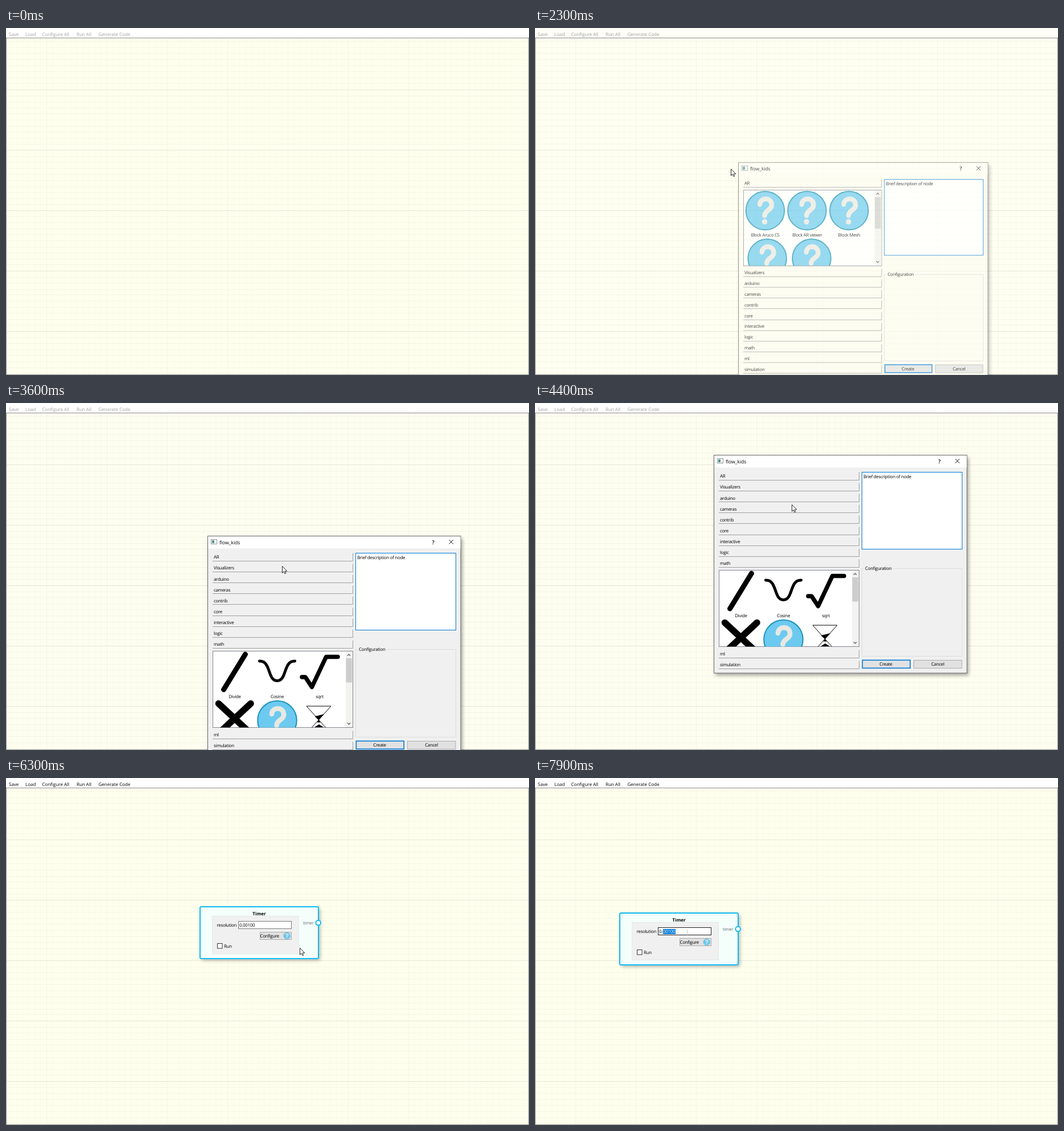
An HTML page that plays this animation: 919x609 px, repeating every 8 s.

```html
<!DOCTYPE html>
<html lang="en">
<head>
<meta charset="utf-8">
<title>Node editor</title>
<style>
html, body { margin: 0; width: 100%; height: 100%; overflow: hidden; background: #fff; }
#stage { display: block; width: 100%; height: 100%; }
text { font: 7.9px "Open Sans", "Noto Sans", sans-serif; letter-spacing: -.28px; text-rendering: geometricPrecision; white-space: pre; }
.mid { text-anchor: middle; }
.menu text { font-size: 8px; letter-spacing: 0; }
.title { font-size: 8.5px; letter-spacing: 0; }
.line { fill: none; stroke: #000; stroke-linecap: round; stroke-linejoin: round; }
.row { fill: none; stroke: #a0a0a0; }
.panel { fill: #fff; stroke: #828790; }
.btn { fill: #e1e1e1; stroke: #adadad; }
.main { stroke: #0078d7; stroke-width: 1.6; }
.group { fill: none; stroke: #dcdcdc; }
.arrow { fill: none; stroke: #505050; stroke-width: 1.2; }

/* 1% = 80 ms */
.menu, .paper, .bar, .face, .cap, .pop, .ar, .math, .before, .after, .node, .pick, .field, .ptr, .beam {
  animation: 8s step-end infinite;
}
.menu { animation-name: menu; }
.bar { animation-name: bar; }
.paper { animation-name: paper; }
.face { animation-name: face; }
.cap { animation-name: bar; }
.pop { animation-name: pop; transform-origin: 537px 283px; }
.ar { animation-name: ar; }
.math { animation-name: math; }
.before { animation-name: before; }
.after { animation-name: after; }
.node { animation-name: node; }
.pick { animation-name: pick; }
.field { animation-name: field; }
.ptr { animation-name: ptr; }
.beam { animation-name: beam; }
.drag { animation: drag 8s linear infinite; }
.carry { animation: carry 8s linear infinite; }
.path { animation: path 8s linear infinite; }

@keyframes menu { 0%, 26.25% { fill: #a0a0a0 } 16.25%, 75%, 100% { fill: #000 } }
@keyframes bar { 0%, 30%, 75%, 100% { fill: #fff } 27.5% { fill: #fefef6 } 63.75% { fill: #fcfcf3 } }
@keyframes paper { 0%, 75%, 100% { fill: #ffffee } 27.5% { fill: #fefef1 } 30% { fill: #fefef0 } 63.75% { fill: #fcfcf2 } }
@keyframes face { 0%, 30%, 75%, 100% { fill: #f0f0f0 } 27.5%, 63.75% { fill: #fcfcf2 } }
@keyframes pop {
  0%, 73.75%, 100% { opacity: 0; transform: scale(.96) }
  27.5% { opacity: .3; transform: scale(.965) }
  28.75% { opacity: .7; transform: scale(.986) }
  30% { opacity: 1; transform: none }
  72.5% { opacity: .6; transform: scale(.98) }
}
@keyframes ar { 0% { visibility: visible } 40%, 100% { visibility: hidden } }
@keyframes math { 0% { visibility: hidden } 40%, 100% { visibility: visible } }
@keyframes before { 0% { visibility: visible } 63.75%, 100% { visibility: hidden } }
@keyframes after { 0% { visibility: hidden } 63.75%, 100% { visibility: visible } }
@keyframes node { 0% { visibility: hidden } 75%, 100% { visibility: visible } }
@keyframes pick { 0% { opacity: 0 } 93.75%, 100% { opacity: 1 } }
@keyframes field { 0% { stroke: #7a7a7a } 92.5%, 100% { stroke: #222 } }
@keyframes ptr { 0%, 91.25%, 100% { visibility: hidden } 7.5% { visibility: visible } }
@keyframes beam { 0% { visibility: hidden } 91.25%, 100% { visibility: visible } }
@keyframes drag {
  0% { transform: translate(40px, 142px) }
  47.5% { transform: translate(40px, 142px); animation-timing-function: steps(4) }
  52.5%, 100% { transform: none }
}
@keyframes carry {
  0% { transform: translate(0, 0) }
  81.25% { transform: translate(0, 0); animation-timing-function: steps(5) }
  87.5%, 100% { transform: translate(-192px, 11px) }
}
@keyframes path {
  0% { transform: translate(58px, 3px) }
  7.5% { transform: translate(58px, 3px); animation-timing-function: steps(5) }
  13.75% { transform: translate(353px, 227px) }
  20% { transform: translate(353px, 227px); animation-timing-function: steps(3) }
  23.75% { transform: translate(344px, 247px) }
  28.75% { transform: translate(344px, 247px); animation-timing-function: steps(6) }
  36.25% { transform: translate(403px, 537px); animation-timing-function: steps(1) }
  37.5% { transform: translate(403px, 561px) }
  40% { transform: translate(403px, 561px); animation-timing-function: steps(2) }
  42.5% { transform: translate(445px, 410px); animation-timing-function: steps(1) }
  45% { transform: translate(485px, 286px); animation-timing-function: steps(2) }
  47.5% { transform: translate(482px, 243px); animation-timing-function: steps(4) }
  52.5% { transform: translate(442px, 101px); animation-timing-function: steps(2) }
  55% { transform: translate(451px, 178px); animation-timing-function: steps(5) }
  61.25% { transform: translate(509px, 407px) }
  63.75% { transform: translate(509px, 407px); animation-timing-function: steps(1) }
  65% { transform: translate(601px, 412px); animation-timing-function: steps(5) }
  71.25% { transform: translate(621px, 295px) }
  75% { transform: translate(621px, 295px); animation-timing-function: steps(3) }
  78.75% { transform: translate(516px, 298px) }
  81.25% { transform: translate(516px, 298px); animation-timing-function: steps(5) }
  87.5% { transform: translate(324px, 309px); animation-timing-function: steps(3) }
  91.25%, 100% { transform: translate(267px, 270px) }
}
</style>
</head>
<body>
<svg id="stage" viewBox="0 0 919 609" preserveAspectRatio="none">
  <defs>
    <clipPath id="arClip"><rect x="324" y="141" width="233" height="134"/></clipPath>
    <clipPath id="mathClip"><rect x="324" y="294" width="233" height="133.5"/></clipPath>
    <g id="help">
      <circle r="34.3" fill="#6ccaf0" stroke="#1a93b8" stroke-width="2"/>
      <path d="M-9.5-11C-9-24.500 13-24.500 11.500-8.500C10-.5-1 0-1 9" fill="none" stroke="#e8e8e2" stroke-width="8.500" stroke-linecap="round"/>
      <circle cx="-1" cy="20" r="4.800" fill="#e8e8e2"/>
    </g>
    <g id="glass">
      <path d="M488 390H531L488 438H531Z" fill="none" stroke="currentColor"/>
      <path d="M502.500 408L519 404L509.500 414.500ZM509.500 414L506.500 418.500H512.500ZM502 427L510 422L518 427Z" fill="currentColor"/>
    </g>
    <filter id="soft" x="-10%" y="-10%" width="125%" height="125%">
      <feGaussianBlur stdDeviation="3"/>
    </filter>
  </defs>

  <rect class="bar" width="919" height="18"/>
  <rect class="paper" y="18" width="919" height="591"/>
  <g id="grid" stroke="#000"></g>
  <rect x=".5" y="17.500" width="918" height="591" fill="none" stroke="#8c8c8c"/>
  <g class="menu">
    <text x="5" y="14">Save</text>
    <text x="34" y="14">Load</text>
    <text x="63.500" y="14">Configure All</text>
    <text x="124" y="14">Run All</text>
    <text x="162.500" y="14">Generate Code</text>
  </g>

  <g class="node"><g class="carry">
    <rect x="344" y="229" width="208" height="91" rx="2" opacity=".3" filter="url(#soft)"/>
    <rect x="341" y="226" width="208" height="91" rx="2" fill="#f4fffc" stroke="#10baf5" stroke-width="2"/>
    <text class="mid" x="445" y="241" style="font-weight:700;font-size:8px;letter-spacing:0">Timer</text>
    <rect x="362.500" y="242.500" width="152" height="66" fill="#f0f0f0" stroke="#e6e8e6"/>
    <text x="370.500" y="261.300">resolution</text>
    <rect class="field" x="408.500" y="251.500" width="93" height="13" fill="#fff"/>
    <text x="410" y="261.300">0.00100</text>
    <g class="pick">
      <rect x="417" y="254" width="22" height="9" fill="#0078d7"/>
      <text x="417" y="261.300" fill="#fff">00100</text>
    </g>
    <rect class="btn" x="446.500" y="270.500" width="55" height="13"/>
    <text x="446.500" y="280.300">Configure</text>
    <use href="#help" transform="translate(493.700 277) scale(.17)"/>
    <rect x="371.500" y="290.500" width="8.500" height="8.500" fill="#fff" stroke="#333"/>
    <text x="383" y="298.300">Run</text>
    <text x="522" y="256.700" fill="#666" style="font-size:7.500px;letter-spacing:-.1px">timer</text>
    <circle cx="548.700" cy="254" r="4.300" fill="#fff" stroke="#10baf5" stroke-width="2"/>
  </g></g>

  <g class="drag"><g class="pop">
    <rect x="317" y="96" width="445" height="382" opacity=".35" filter="url(#soft)"/>
    <rect class="face" x="314.500" y="91.500" width="444.500" height="382.500" stroke="#666"/>
    <rect class="cap" x="315" y="92" width="443.500" height="21"/>
    <rect x="320.500" y="97.500" width="10" height="8" fill="#fff" stroke="#8a9496"/>
    <rect x="322" y="99" width="4" height="5" fill="#4d9288"/>
    <text class="title" x="335" y="106">flow_kids</text>
    <text class="mid" x="710.500" y="105.500" style="font-size:9.500px;font-weight:600">?</text>
    <path d="M738.500 98L746 105.500M746 98L738.500 105.500" stroke="#111"/>

    <g class="ar">
      <g id="arRows"></g>
      <rect class="panel" x="323.500" y="140.500" width="246" height="135"/>
      <g clip-path="url(#arClip)">
        <use href="#help" x="362" y="177"/>
        <use href="#help" x="436.600" y="177"/>
        <use href="#help" x="511.500" y="177"/>
        <use href="#help" x="365.700" y="262"/>
        <use href="#help" x="444.800" y="262"/>
      </g>
      <text class="mid" x="362" y="223">Block Aruco CS</text>
      <text class="mid" x="437" y="223">Block AR viewer</text>
      <text class="mid" x="511.500" y="223">Block Mesh</text>
      <rect x="557" y="141" width="12" height="134" fill="#f2f2f0"/>
      <rect x="557.500" y="153" width="10.500" height="56" fill="#cdcdcd"/>
      <path class="arrow" d="M560 148.500L562.500 146L565 148.500M560 267L562.500 269.500L565 267"/>
    </g>

    <g class="math">
      <g id="mathRows"></g>
      <rect class="panel face-in" x="323.500" y="293.500" width="246" height="134"/>
      <g clip-path="url(#mathClip)">
        <path class="line" d="M342.500 361L380.500 299" stroke-width="9"/>
        <path class="line" d="M405.500 311C426 310 419 345.500 436.500 345.500C454 345.500 447 310 467.500 311" stroke-width="5"/>
        <path class="line" d="M480 339H486L497.500 356.500L522.500 303.500H543" stroke-width="7.500"/>
        <path class="line" d="M333.500 385.500L390 438M390 385.500L333.500 438" stroke-width="11.500"/>
        <use href="#help" x="436.500" y="415"/>
        <use href="#glass" color="#000"/>
      </g>
      <text class="mid" x="362" y="375.700">Divide</text>
      <text class="mid" x="436.500" y="375.700">Cosine</text>
      <text class="mid" x="511" y="375.700">sqrt</text>
      <rect x="557" y="294" width="12" height="133" fill="#f2f2f0"/>
      <rect x="557.500" y="306" width="10.500" height="42.500" fill="#cdcdcd"/>
      <path class="arrow" d="M560 301.500L562.500 299L565 301.500M560 419.500L562.500 422L565 419.500"/>
    </g>

    <g class="before">
      <rect x="574.500" y="121.500" width="176" height="135" fill="#fff" stroke="#0078d7"/>
      <text x="577" y="132">Brief description of node</text>
      <path class="group" d="M629 290.500H750.500V444.500H574.500V290.500H577"/>
      <text x="580" y="293.300">Configuration</text>
      <g id="lowButtons"></g>
    </g>
    <g class="after">
      <rect x="574.500" y="121.500" width="176" height="135" fill="#fdfdf5" stroke="#7a7a7a"/>
      <text x="577" y="132">Stream a timer. Resolution is in seconds   -</text>
      <text x="577" y="141.500">Outputs: Time counter</text>
      <path class="group" d="M629 310.500H750.500V465.500H574.500V310.500H577"/>
      <text x="580" y="313.800">Configuration</text>
      <g id="highButtons"></g>
      <rect x="324" y="294" width="233" height="133" fill="#fcfcf2" style="mix-blend-mode:multiply"/>
      <rect x="475" y="378.500" width="73" height="49" fill="#cce8ff"/>
      <g clip-path="url(#mathClip)"><use href="#glass" color="#0b2a40"/></g>
    </g>
  </g></g>

  <g class="path">
    <path class="ptr" d="M.5.5V12.200L3.200 9.700L5 13.700L6.800 12.900L5.100 9H8.800Z" fill="#fff" stroke="#111" stroke-width=".9"/>
    <path class="beam" d="M.5-4V6" stroke="#b4b4b4" stroke-width=".7"/>
  </g>
</svg>
<script>
const names = ["AR", "Visualizers", "arduino", "cameras", "contrib", "core",
  "interactive", "logic", "math", "ml", "simulation"];
const pitch = 19.1;
const fill = (id, html) => document.getElementById(id).innerHTML = html;

// Rows up to the open one stack from the top, the rest from the bottom.
function rows(open) {
  return names.map((name, i) => {
    const y = i <= open ? 128 + pitch * i : 459 - pitch * (names.length - 1 - i);
    const base = Math.round(y + 7) + .5;
    return `<path class="row" d="M323 ${base}H569.5V${base - 14}"/><text x="325" y="${y + 3.3}">${name}</text>`;
  }).join("");
}

function buttons(y) {
  return `<rect class="btn main" x="575.3" y="${y + .3}" width="84" height="14"/>
    <rect class="btn" x="665.5" y="${y + .5}" width="84.5" height="14"/>
    <text class="mid" x="616.5" y="${y + 10.3}">Create</text>
    <text class="mid" x="707.5" y="${y + 10.3}">Cancel</text>`;
}

function grid() {
  let out = "";
  const add = (d, alpha) => out += `<path d="${d}" opacity="${alpha}"/>`;
  for (let i = -8; i <= 47; i++) {
    const y = Math.round(108 + 10.6 * i) + .5;
    if (y > 20 && y < 608) add(`M1 ${y}H918`, i % 10 ? .03 : .09);
  }
  for (let i = -6; i <= 79; i++) {
    const x = Math.round(71 + 10.6 * i) + .5;
    if (x < 918) add(`M${x} 18V608`, i % 10 ? .012 : .03);
  }
  return out;
}

fill("arRows", rows(0));
fill("mathRows", rows(8));
fill("lowButtons", buttons(451));
fill("highButtons", buttons(286.5));
fill("grid", grid());
</script>
</body>
</html>
```
